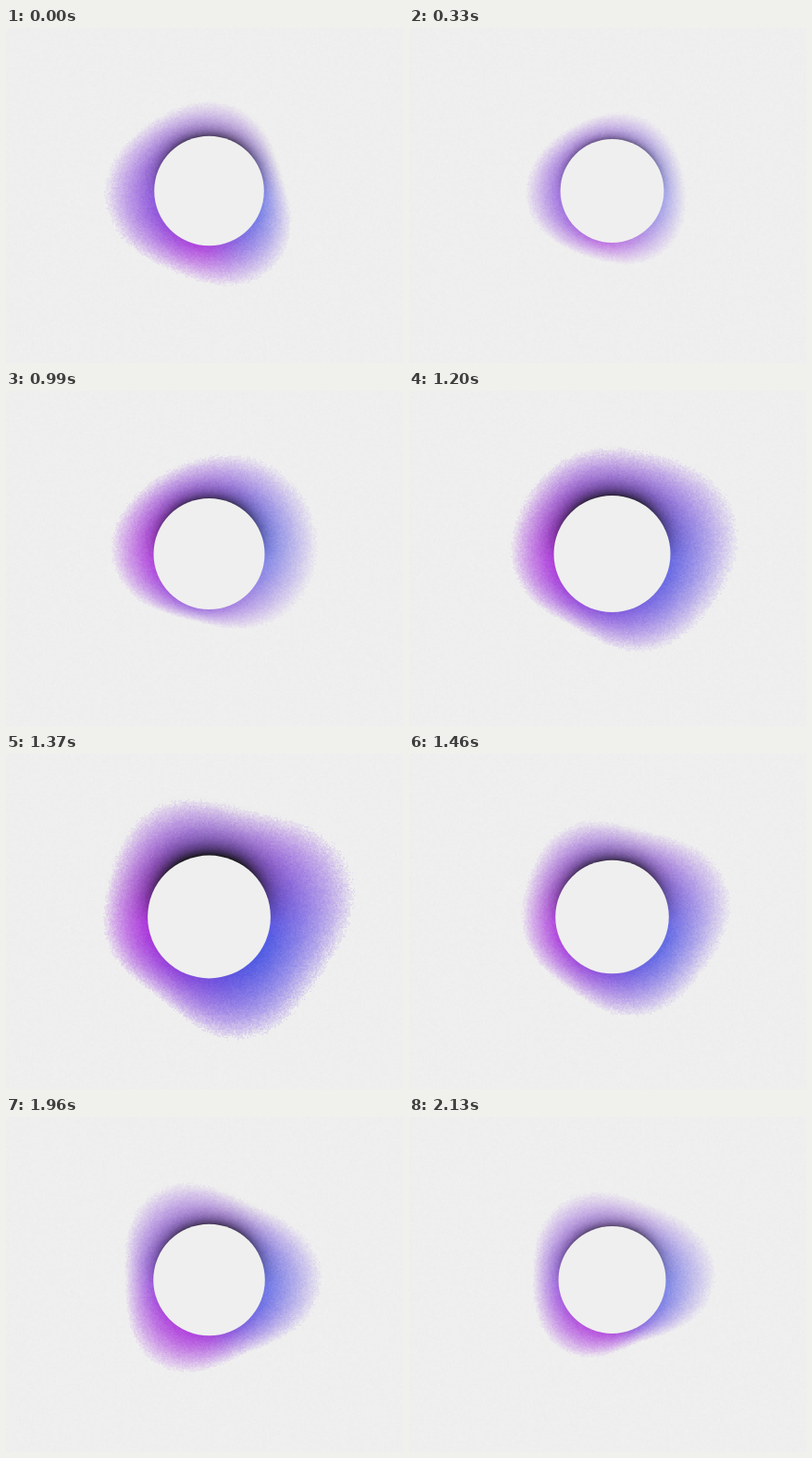
These frames come from a looping animation (429x362 px, 2.23 s). An HTML page with a canvas:

```html
<!DOCTYPE html>
<html lang="en">
<head>
<meta charset="utf-8">
<title>Pulsing glow</title>
<style>
html, body { margin: 0; width: 100%; height: 100%; overflow: hidden; background: #eee; }
canvas { display: block; }
</style>
</head>
<body>
<canvas id="stage" width="429" height="362"></canvas>
<script>
const W = 429, H = 362, CX = 219.5, CY = 176;
const LOOP = 2230, TICK = 10, BINS = 720, LAYERS = 14, PAPER = 238;
const VIOLET = [125, 62, 215], BLUE = [68, 80, 226], PINK = [165, 36, 216], RIM = [196, 145, 236];

const ctx = document.getElementById('stage').getContext('2d');
const img = ctx.createImageData(W, H);

// The beat: time and disc radius; everything else grows with the radius
const BEAT = [
  [0, 59.3], [60, 59.3], [560, 55], [620, 55.5], [710, 57.6], [930, 61], [990, 60],
  [1140, 56.5], [1199, 56.5], [1200, 63], [1260, 71.5], [1370, 66.4],
  [1720, 55], [1839, 55], [1840, 70], [1960, 60.3], [2130, 58], [LOOP, 58]
];

// lobes: [size, direction] of the 1st, 2nd, 3rd... harmonic of the outline
// blue, pink, pale: directions of those tints; fade: how pale the pale side is
const POSES = [
  { at: 60, lobes: [[.097, 149], [.05, 47], [.07, 51]], blue: 15, pink: 85, pale: -45, fade: .4 },
  { at: 710, lobes: [[.113, -64], [.088, -11], [.035, 55]], blue: -25, pink: 70, pale: 40, fade: .45 },
  { at: 990, lobes: [[.154, -56], [.097, 0], [.034, 53]], blue: -10, pink: 185, pale: 50, fade: .35 },
  { at: 1370, lobes: [[.147, -14], [.046, 23], [.039, -26], [.057, -20]], blue: 35, pink: 180, pale: -110, fade: .1 },
  { at: 1720, lobes: [[.047, 47], [.075, 14], [.047, 0]], blue: 15, pink: 150, pale: -70, fade: .25 },
  { at: 1960, lobes: [[.05, -29], [.037, 2], [.106, 0]], blue: 5, pink: 120, pale: -70, fade: .2 },
  { at: 2130, lobes: [[.087, -58], [.07, -12], [.091, 0]], blue: 5, pink: 110, pale: -60, fade: .25 }
];

const mix = (a, b, u) => a + (b - a) * u;
const clamp = (x, a, b) => Math.min(b, Math.max(a, x));
const cosFrom = (deg, dir, k = 1) => Math.cos(k * (deg - dir) * Math.PI / 180);
const side = (deg, dir) => Math.max(0, cosFrom(deg, dir)) ** 2;

function hash(x, y) {
  let n = Math.imul(x + 17, 374761393) ^ Math.imul(y + 91, 668265263);
  n = Math.imul(n ^ (n >>> 13), 1274126177);
  return ((n ^ (n >>> 16)) >>> 0) / 4294967296;
}

// Neighbouring entries of a timeline and the progress between them
function between(list, t, time) {
  let k = list.findIndex(e => time(e) > t);
  if (k < 0) k = list.length;
  const a = list[Math.max(0, k - 1)], b = list[Math.min(k, list.length - 1)];
  return [a, b, a === b ? 0 : (t - time(a)) / (time(b) - time(a))];
}

function radiusAt(t) {
  const [a, b, u] = between(BEAT, t, e => e[0]);
  return mix(a[1], b[1], b[1] < a[1] ? u * (2 - u) : u);
}

// Outline factor, density and tint of a pose in one direction
function look(pose, deg) {
  const blue = side(deg, pose.blue), pink = side(deg, pose.pink) * (1 - blue);
  return [
    pose.lobes.reduce((sum, [size, dir], i) => sum + size * cosFrom(deg, dir, i + 1), 1),
    1 - pose.fade * cosFrom(deg, pose.pale),
    ...VIOLET.map((v, j) => mix(mix(v, PINK[j], pink), BLUE[j], blue))
  ];
}

const bin = new Uint16Array(W * H);
const dist = new Float32Array(W * H);
const grain = new Float32Array(W * H);
const paper = new Float32Array(W * H);
for (let y = 0, i = 0; y < H; y++) {
  for (let x = 0; x < W; x++, i++) {
    const dx = x + 0.5 - CX, dy = y + 0.5 - CY;
    const turn = Math.atan2(dy, dx) / (2 * Math.PI) + 1;
    bin[i] = Math.floor(turn * BINS) % BINS;
    dist[i] = Math.hypot(dx, dy);
    grain[i] = hash(x >> 1, y >> 1) + 0.5 * hash(x + 500, y) - 0.75;
    paper[i] = PAPER + (hash((x >> 1) + 900, y >> 1) - 0.5) * 2.4;
  }
}

function draw(t) {
  const R = radiusAt(t), level = R - 55;
  const reach = 79.5 + 4.15 * level;
  const density = 0.05 + 0.009 * level;
  const dark = clamp(0.42 + 0.05 * level, 0, 1);
  const depth = 4 + 0.7 * level;
  const [from, to, u] = between(POSES, t, p => p.at);

  const rays = Array.from({ length: BINS }, (_, i) => {
    const deg = i * 360 / BINS, next = look(to, deg);
    const [size, thick, ...tint] = look(from, deg).map((v, j) => mix(v, next[j], u));
    return {
      gap: reach * size - R,
      pass: 1 - density * thick,
      shade: dark * clamp(0.1 + cosFrom(deg, -90), 0, 1),
      tint
    };
  });

  const px = img.data;
  for (let i = 0, o = 0; i < W * H; i++, o += 4) {
    const { gap, pass, shade, tint } = rays[bin[i]];
    const d = dist[i] - R;
    let alpha = 0, rim = 0, near = 0;
    if (d > -3 && d < gap * 1.1) {
      const f = clamp(d / gap + grain[i] * 0.08, 0, 1);
      const layers = Math.ceil((1 - f) * LAYERS);
      alpha = 1 - pass ** layers;
      rim = 0.7 * (1 - layers / LAYERS);
      near = shade * Math.exp(-Math.max(0, d) / depth);
    }
    for (let j = 0; j < 3; j++) {
      const glow = mix(paper[i], mix(tint[j], RIM[j], rim), alpha);
      px[o + j] = mix(glow, 22, near) + 0.5;
    }
    px[o + 3] = 255;
  }
  ctx.putImageData(img, 0, 0);

  ctx.fillStyle = '#efefef';
  ctx.beginPath();
  ctx.arc(CX, CY, R, 0, 2 * Math.PI);
  ctx.fill();
}

const start = performance.now();
let shown = -1;
function frame() {
  const t = Math.floor((performance.now() - start) % LOOP / TICK) * TICK;
  if (t !== shown) draw(shown = t);
  requestAnimationFrame(frame);
}
frame();
</script>
</body>
</html>
```
